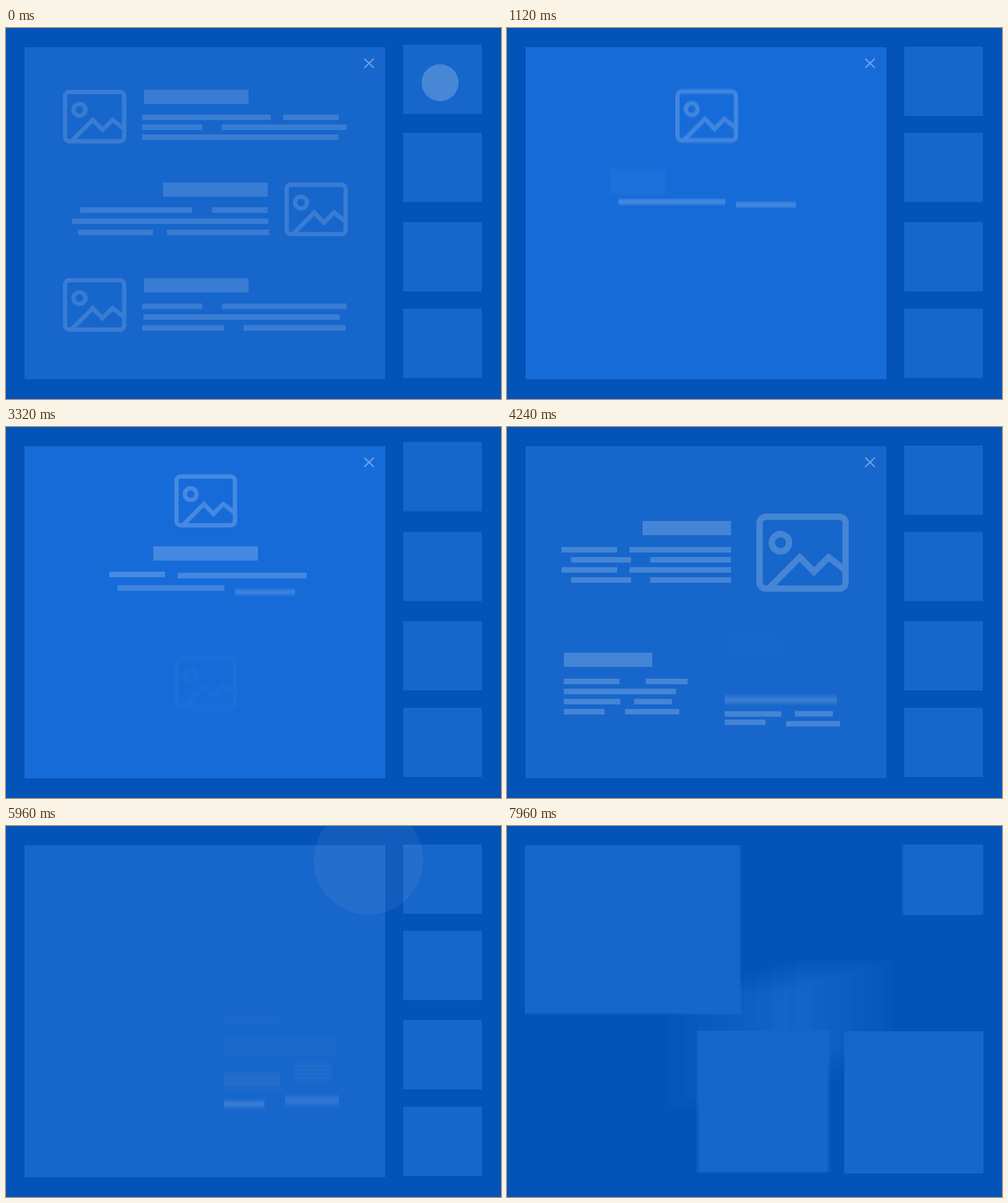
Recreate the animation shown at these times as an HTML page with a canvas. Size 800x600 px, loop 8000 ms.

```html
<!DOCTYPE html>
<html lang="en">
<head>
<meta charset="utf-8">
<title>Panel and tiles</title>
<style>
  html, body { margin: 0; width: 100%; height: 100%; overflow: hidden; background: #0353b8; }
  canvas { display: block; }
</style>
</head>
<body>
<canvas id="stage" width="800" height="600"></canvas>
<script>
const ctx = document.getElementById('stage').getContext('2d');
const LOOP = 8000, STEP = 40, BACKGROUND = '#0353b8', TILE = 'rgb(23,102,203)';

const clamp = v => Math.max(0, Math.min(1, v));
const mix = (a, b, p) => a + (b - a) * p;
const smooth = v => { v = clamp(v); return v * v * (3 - 2 * v); };
const steep = v => { v = clamp(v); return v < .5 ? 16 * v ** 5 : 1 - 16 * (1 - v) ** 5; };

// Tiles move between a sidebar layout (home) and a grid layout (cell), one after the other.
const cells = [[406, 31, 364, 269], [29, 332, 235, 230], [303, 332, 212, 230], [545, 332, 225, 230]];
const thumbs = [30, 169.5, 314, 454].map((y, i) => (
  { home: [642, y, 127, 112], cell: cells[i], out: 5950 + 30 * i, back: 7650 + 105 * i, hop: i ? 0 : 28 }));
const panel = { home: [30, 31, 583, 537], cell: [29, 31, 345, 269], out: 6070, back: 7867, hop: 0 };
const tiles = [thumbs[1], thumbs[0], thumbs[2], thumbs[3], panel];
const hops = [[-160, 1000], [2520, 1000], [5440, 500]];

function tileBox({ home, cell, out, back, hop }, t) {
  const p = steep((t - out) / 400) - steep((t - back) / 400);
  const box = home.map((v, i) => mix(v, cell[i], p));
  for (const [start, length] of hops) box[1] -= hop * Math.sin(Math.PI * clamp((t - start) / length)) ** 3;
  return box;
}

function drawTile(tile, t) {
  const samples = Array.from({ length: 10 }, (_, i) => tileBox(tile, t + (i - 4.5) * 3.5));
  const travel = Math.abs(samples[9][0] - samples[0][0]) + Math.abs(samples[9][2] - samples[0][2]);
  if (travel < 1) {
    ctx.fillStyle = TILE;
    ctx.fillRect(...tileBox(tile, t));
    return;
  }
  // Motion blur: add up faint copies.
  ctx.globalCompositeOperation = 'lighter';
  ctx.fillStyle = 'rgb(2,2,2)';
  for (const box of samples) ctx.fillRect(...box);
  ctx.globalCompositeOperation = 'source-over';
}

function drawTiles(t) {
  tiles.forEach(tile => drawTile(tile, t));
  // Overlapping blurs never get brighter than a tile.
  ctx.globalCompositeOperation = 'darken';
  ctx.fillStyle = TILE;
  ctx.fillRect(0, 0, 800, 600);
  ctx.globalCompositeOperation = 'source-over';
  ctx.globalAlpha = smooth((t - 200) / 700) - smooth((t - 3350) / 750);
  ctx.fillStyle = 'rgb(23,107,217)';
  ctx.fillRect(...panel.home);
  ctx.globalAlpha = 1;
}

function picture(x, y, scale) {
  ctx.save();
  ctx.translate(x, y);
  ctx.scale(scale, scale);
  ctx.beginPath();
  ctx.roundRect(3.5, 3.5, 94.5, 79, 7);
  ctx.moveTo(36, 32);
  ctx.arc(26.5, 32, 9.5, 0, 2 * Math.PI);
  ctx.moveTo(14, 82);
  for (const [px, py] of [[47.7, 48], [63.3, 64], [79.3, 48], [98, 62.5]]) ctx.lineTo(px, py);
  ctx.lineWidth = 7;
  ctx.stroke();
  ctx.restore();
}

// A text block: a title and lines given as [indent, word width, gap, word width].
function block({ icon, title, x, lead = 42, pitch = 16.3, lines, ...motion }) {
  const [titleX, y, width] = title, last = lines.length - 1;
  const bar = (bx, by, w, h) => dy => ctx.fillRect(bx, by + dy, w, h);
  const parts = [{ draw: bar(titleX, y, width, 23), line: -1, rank: last, extra: 1, lag: 0 }];
  if (icon) parts.push({ draw: dy => picture(icon[0], icon[1] + dy, icon[2]), line: -1, rank: last, extra: 2, lag: 0, icon: true });
  lines.forEach(([indent, first, gap, second], line) => {
    const place = { line, rank: last - line, extra: 0 }, lineY = y + lead + line * pitch;
    parts.push({ ...place, lag: 0, draw: bar(x + indent, lineY, first, 9) });
    if (second) parts.push({ ...place, lag: 1, draw: bar(x + indent + first + gap, lineY, second, 9) });
  });
  return { parts, opacity: .2, gap: 40, ...motion };
}

const article = options => block({ lead: 40, pitch: 16, opacity: .145, ...options });

const stacked = (y, motion) => block({ icon: [272, y, 1], title: [238, y + 119.5, 169], x: 167, pitch: 16,
  lines: [[0, 90, 20.5, 208.5], [13, 173, 17, 97]], gap: 148, ...motion });

const column = (x, motion) => block({ title: [x, 365, 143], x,
  lines: [[0, 90, 42.5, 67.5], [0, 181.5], [0, 91.5, 22, 61.5], [0, 66, 33, 87.5]], ...motion });

const wideLine = [0, 90, 20, 164], indentedLine = [15.5, 97, 31, 130.5];

const blocks = [
  article({ icon: [92, 100, 1.01], title: [223, 100, 169], x: 220, fall: 400,
    lines: [[0, 208, 20, 90], [0, 97, 32, 201.5], [0, 317]] }),
  article({ icon: [450, 250, 1.01], title: [254, 250, 169], x: 107, fall: 340, pitch: 18,
    lines: [[13, 181, 32, 90], [0, 317], [9.5, 121, 22.5, 165]] }),
  article({ icon: [92, 404.5, 1.01], title: [223, 404.5, 169], x: 220, fall: 280, lead: 41, pitch: 17.5,
    lines: [[0, 97, 32, 201.5], [2, 317.5], [0, 132, 32, 165]] }),
  stacked(92.5, { enter: 880, fall: 3255 }),
  stacked(332.5, { enter: 1070, fall: 2975 }),
  block({ icon: [403, 140, 1.472], title: [219, 152, 143], x: 88,
    lines: [wideLine, indentedLine, wideLine, indentedLine], enter: 3760, leave: 5480 }),
  column(91.8, { enter: 3770, leave: 5600 }),
  column(351.8, { enter: 4049, leave: 5745 })
];

// Drops in from above, overshoots and settles.
function drop(u) {
  const f = steep(u / 160);
  return { dy: -100 + 120 * f - 20 * smooth((u - 160) / 130), alpha: f ** 1.6 };
}

// Rises a little, then falls and fades.
function fall(u) {
  const f = clamp(u / 240) ** 2;
  return { dy: -20 * smooth((u + 260) / 260) + 80 * f, alpha: (1 - f) ** 1.6 };
}

// Flies off upwards.
function lift(u) {
  const f = steep(u / 300);
  return { dy: -110 * f, alpha: (1 - f) ** 1.2 };
}

// Blocks enter and fall from the bottom line up, and lift from the top line down.
function pose(b, part, t) {
  const { line, rank, extra, lag } = part;
  const fallTime = t - b.fall - rank * 60 - extra * 40 + lag * 30;
  if (fallTime > -260) return fall(fallTime);
  const liftTime = t - b.leave - (line + 1) * 27 + lag * 10;
  if (liftTime > 0) return lift(liftTime);
  if (!b.enter) return { dy: 0, alpha: 1 };
  return drop(t - b.enter - (part.icon ? 0 : rank * b.gap + extra * 40 + lag * 20));
}

function drawBlock(b, t) {
  for (const part of b.parts) {
    const { dy, alpha } = pose(b, part, t);
    if (alpha < .01) continue;
    const before = pose(b, part, t - 8).dy, after = pose(b, part, t + 8).dy;
    const count = Math.abs(after - before) > 3 ? 5 : 1;
    ctx.globalAlpha = b.opacity * alpha / count;
    for (let k = 0; k < count; k++) part.draw(count > 1 ? mix(before, after, k / (count - 1)) : dy);
  }
  ctx.globalAlpha = 1;
}

function drawClose(t) {
  ctx.globalAlpha = .4 * (1 - smooth((t - 5720) / 180));
  ctx.lineWidth = 2;
  ctx.beginPath();
  ctx.moveTo(579, 49.5); ctx.lineTo(594.5, 64.5);
  ctx.moveTo(594.5, 49.5); ctx.lineTo(579, 64.5);
  ctx.stroke();
  ctx.globalAlpha = 1;
}

// A tap shrinks slightly while pressed, then spreads and fades.
function drawTap([x, y, start], t) {
  const u = t - start;
  if (u < 0 || u > 600) return;
  const spread = 1 - (1 - clamp((u - 200) / 400)) ** 2;
  const radius = mix(30.5 - 3.5 * smooth(u / 150), 91, spread);
  ctx.globalAlpha = Math.min(.1 + u * .00275, .24) * clamp((600 - u) / 350);
  ctx.beginPath();
  ctx.arc(x, y, radius, 0, 2 * Math.PI);
  ctx.fill();
  ctx.globalAlpha = 1;
}

const taps = [[701.5, 88.5, -40], [701.5, 229.5, 2560], [586, 55, 5440]];

function render(t) {
  ctx.fillStyle = BACKGROUND;
  ctx.fillRect(0, 0, 800, 600);
  drawTiles(t);
  ctx.fillStyle = ctx.strokeStyle = '#fff';
  blocks.forEach(b => drawBlock(b, t));
  drawClose(t);
  taps.forEach(tap => drawTap(tap, t));
}

function frame() {
  render(Math.floor(performance.now() % LOOP / STEP) * STEP);
  requestAnimationFrame(frame);
}
frame();
</script>
</body>
</html>
```
